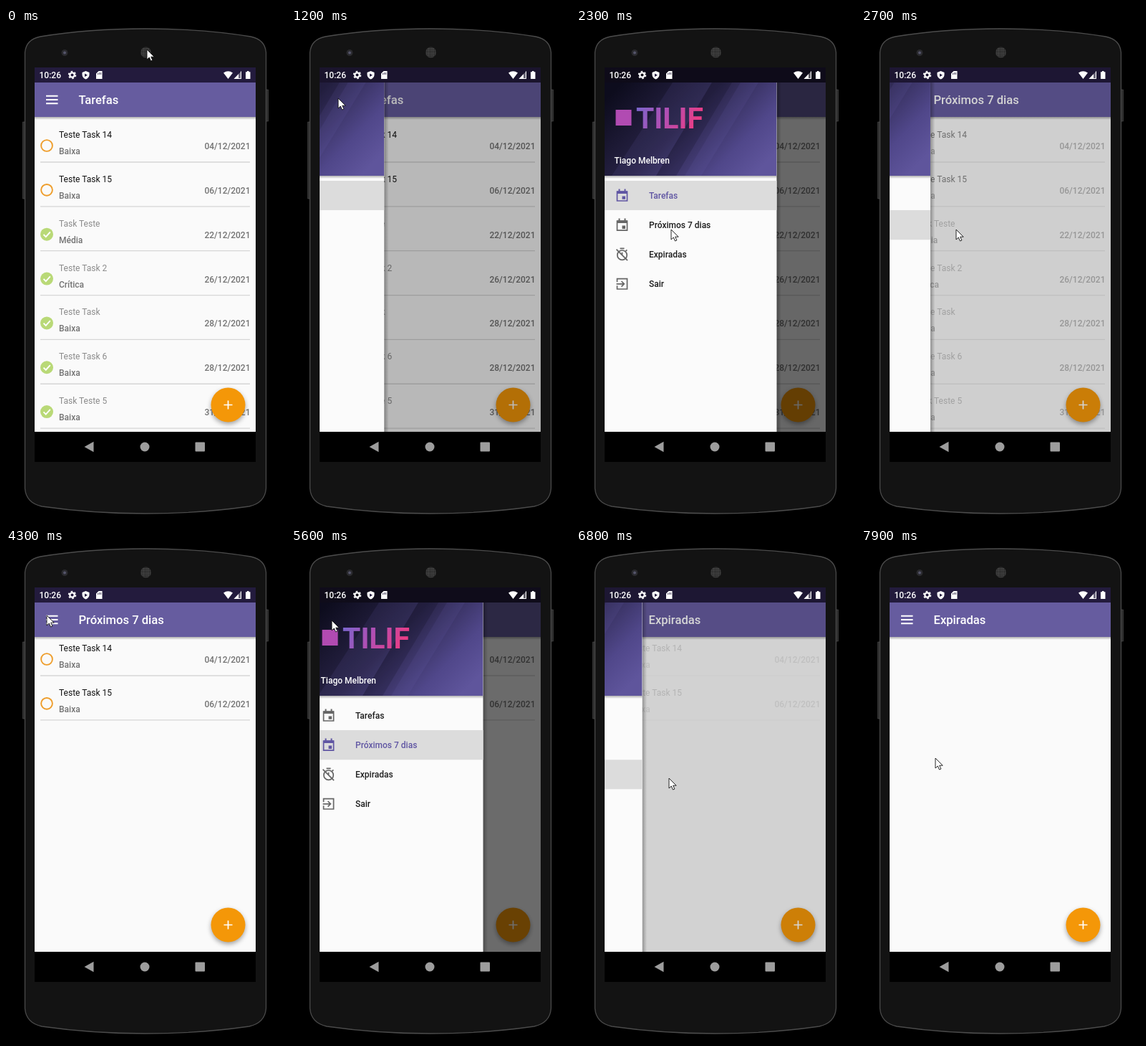
Animation of 390 by 686 pixels, one loop 8 s. Source, as an HTML page:

```html
<!DOCTYPE html>
<html lang="pt">
<head>
<meta charset="utf-8">
<title>Tarefas</title>
<style>
  html, body { margin: 0; width: 100%; height: 100%; overflow: hidden; background: #000; }
  svg { display: block; width: 390px; height: 686px; }
  text { font: 400 12px Roboto, "Noto Sans", sans-serif; }
  .med { font-weight: 500; }
  .sub { font-weight: 500; fill: #737373; }
  .end { text-anchor: end; }
  .title { font-size: 16.6px; font-weight: 500; fill: #fff; }
  .brand { font-size: 41px; font-weight: 700; }
  .fab { filter: drop-shadow(0 3px 3px rgba(0, 0, 0, .35)); }
  .item { color: #666; fill: #1d1d1d; }
  .item.on { color: #6056a3; fill: #6056a3; }
  .item .bg { fill: none; }
  .item.on .bg { fill: #dcdcdc; }
  .line { fill: none; stroke: currentColor; stroke-width: 1.7; }
</style>
</head>
<body>
<svg viewBox="0 0 390 686">
  <defs>
    <clipPath id="screen"><path d="M40 76H349V563H40Z"/></clipPath>
    <clipPath id="headClip"><path d="M0 76H240.5V206H0Z"/></clipPath>
    <linearGradient id="head" gradientUnits="userSpaceOnUse" x1="30" y1="70" x2="190" y2="225">
      <stop offset="0" stop-color="#0d0c1d"/>
      <stop offset=".45" stop-color="#292448"/>
      <stop offset=".8" stop-color="#50478a"/>
      <stop offset="1" stop-color="#5f559c"/>
    </linearGradient>
    <linearGradient id="brand" x2="1" y2=".25">
      <stop offset="0" stop-color="#7468cf"/>
      <stop offset=".5" stop-color="#b04fb4"/>
      <stop offset="1" stop-color="#e93d86"/>
    </linearGradient>
    <linearGradient id="edge">
      <stop offset="0" stop-opacity=".3"/>
      <stop offset="1" stop-opacity="0"/>
    </linearGradient>
    <linearGradient id="drop" x2="0" y2="1">
      <stop offset="0" stop-opacity=".3"/>
      <stop offset="1" stop-opacity="0"/>
    </linearGradient>
    <pattern id="mesh" width="2.4" height="2.4" patternUnits="userSpaceOnUse">
      <path d="M0 0H2.4V2.4H0Z" fill="#4a4a4a"/><circle cx="1.2" cy="1.2" r=".85" fill="#111"/>
    </pattern>
  </defs>

  <!-- phone -->
  <path d="M23.5 131H27V238H23.5ZM363 86H366.5V130H363Z" fill="#2b2b2b" stroke="#4c4c4c" stroke-width=".7"/>
  <path d="M26.5 34Q28 16 48 12Q115 1 195 1Q275 1 342 12Q362 16 363.5 34V642Q362 662 340 667Q270 677 195 677Q120 677 50 667Q28 662 26.5 642Z" fill="#131313" stroke="#4b4b4b" stroke-width="1.3"/>
  <circle cx="82" cy="34.5" r="4.5" fill="#2a2a2e"/>
  <circle cx="82" cy="34.5" r="2" fill="#55556a"/>
  <circle cx="195.5" cy="34" r="7.5" fill="url(#mesh)"/>
  <path d="M40 55H349V605H40Z"/>
  <path d="M40 55H349V76H40Z" fill="#231b3d"/>

  <g clip-path="url(#screen)">
    <path d="M40 124H349V563H40Z" fill="#fafafa"/>
    <g id="list"></g>
    <path d="M40 124H349V128H40Z" fill="url(#drop)"/>
    <path d="M40 76H349V124H40Z" fill="#665c9f"/>
    <path d="M56 94.8H72.5M56 100H72.5M56 105.2H72.5" stroke="#fff" stroke-width="1.9"/>
    <text class="title" id="title" x="101.5" y="106"></text>
    <g class="fab"><circle cx="310.5" cy="525.5" r="24" fill="#f49708"/></g>
    <path d="M304.5 525.5H316.5M310.5 519.5V531.5" stroke="#fff" stroke-width="1.7"/>
  </g>

  <path id="dim" d="M40 55H349V563H40Z"/>

  <g clip-path="url(#screen)">
    <g id="drawer">
      <path d="M240.5 76H247V563H240.5Z" fill="url(#edge)"/>
      <path d="M0 76H240.5V563H0Z" fill="#fbfbfb"/>
      <path d="M0 206H240.5V210H0Z" fill="url(#drop)"/>
      <g clip-path="url(#headClip)">
        <path d="M0 76H240.5V206H0Z" fill="url(#head)"/>
        <path d="M95 76H150L72 206H10ZM190 76H215L135 206H112Z" fill="#7a6fc0" opacity=".1"/>
        <path d="M150 76H178L100 206H72Z" fill="#05040f" opacity=".16"/>
      </g>
      <path d="M15.5 114H37.5V136H15.5Z" fill="#b14bb2"/>
      <text class="brand" x="44" y="140" fill="url(#brand)">TILIF</text>
      <text class="med" x="13.5" y="189" fill="#fff">Tiago Melbren</text>
      <g id="menu"></g>
    </g>
  </g>

  <!-- status bar -->
  <text class="med" x="46.5" y="70" fill="#fff">10:26</text>
  <g fill="none" stroke="#fff">
    <circle cx="92.5" cy="65.5" r="3.2" stroke-width="2.3"/>
    <circle cx="92.5" cy="65.5" r="4.9" stroke-width="1.7" stroke-dasharray="2.57"/>
  </g>
  <g fill="#fff">
    <path d="M111.5 60L116.5 62V65.5Q116 69.7 111.5 71.5Q107 69.7 106.5 65.5V62Z"/>
    <path d="M129.5 60H134.5V71H126V63.5Z"/>
    <path d="M304 62.5Q310.5 57.8 317 62.5L310.5 71Z"/>
    <path d="M318.5 71L329 60V71Z" fill-opacity=".35"/>
    <path d="M318.5 71L325 64.2V71ZM328 60.5H329V71H318.5L319.5 70H328Z"/>
    <path d="M335 61.3H337V60H339.5V61.3H341.5V71H335Z"/>
  </g>
  <path d="M110 63.5L114 65.7L110 68Z" fill="#231b3d"/>
  <path d="M128.5 63V65M130.5 62V65M132.5 62V65" stroke="#231b3d" stroke-width=".8"/>

  <!-- navigation bar -->
  <g fill="#9d9d9d">
    <path d="M109.5 584L122.5 576.8V591.2Z"/>
    <circle cx="194" cy="584" r="6.5"/>
    <rect x="264.5" y="577.5" width="13.5" height="13" rx="1"/>
  </g>

  <path id="cursor" d="M0 0V14L3.3 11L5.5 16L7.9 15L5.7 10.2H10.2Z" fill="#fff" stroke="#111" stroke-width=".9"/>
</svg>

<script>
const LOOP = 8000, STEP = 100, TAU = 100, WIDTH = 240.5, ROW = 61.85;
const $ = id => document.getElementById(id);

const todo = [
  ['Teste Task 14', 'Baixa', '04/12/2021'],
  ['Teste Task 15', 'Baixa', '06/12/2021'],
  ['Task Teste', 'Média', '22/12/2021', true],
  ['Teste Task 2', 'Crítica', '26/12/2021', true],
  ['Teste Task', 'Baixa', '28/12/2021', true],
  ['Teste Task 6', 'Baixa', '28/12/2021', true],
  ['Task Teste 5', 'Baixa', '31/12/2021', true]
];

const calendar = `<path class="line" d="M-7 -5.5H7V7.5H-7Z"/>
  <path d="M-7 -6H7V-2.5H-7ZM-5 -9H-3V-5H-5ZM3 -9H5V-5H3ZM0 1H4.5V5.3H0Z" fill="currentColor"/>`;
const timerOff = `<circle class="line" cy="1" r="6.7"/>
  <path class="line" d="M-3 -8.3H3M0 -3V1.5M5 -4.5L6.8 -6.3M-8 -7L7.5 8.5"/>`;
const exit = `<path class="line" d="M-7 -2.5V-7.2H7V7.2H-7V2.5M-8 0H2.5M-1 -3.8L2.8 0L-1 3.8"/>`;
const items = [['Tarefas', calendar], ['Próximos 7 dias', calendar], ['Expiradas', timerOff], ['Sair', exit]];

// Drawer toggles: time, open
const toggles = [[1153, 1], [2556, 0], [5300, 1], [6648, 0]];
const pages = [[0, 0], [2556, 1], [6648, 2]];
// Lists: appear, start of fade, end of fade, vertical shift, rows
const lists = [[0, 2556, 2846, 0, 7], [3500, 6648, 6828, -9, 2]];
// Pointer: time, x, y
const path = [
  [0, 197, 30], [100, 195, 32], [800, 68, 97], [900, 66, 98], [1600, 66, 98],
  [2000, 107, 205], [2300, 133, 281], [3400, 133, 281], [4000, 62, 105],
  [4300, 57, 94], [5400, 57, 94], [5500, 57, 101], [5700, 57, 101],
  [6200, 121, 305], [6400, 130, 321], [7100, 130, 321], [7500, 107, 295],
  [7700, 106, 295], [7900, 104, 293], [8000, 104, 293]
];

const mark = done => done
  ? `<circle cx="57" cy="164" r="9" fill="#b9d977"/>
     <path d="M52.5 164.3L55.7 167.5L61.8 160.8" fill="none" stroke="#fff" stroke-width="1.9"/>`
  : `<circle cx="57" cy="164" r="7.9" fill="none" stroke="#ee9d2b" stroke-width="1.9"/>`;

const rowMarkup = ([name, level, date, done], i) => `<g transform="translate(0 ${i * ROW})">
  ${mark(done)}
  <text x="74" y="153" fill="${done ? '#8b8b8b' : '#111'}">${name}</text>
  <text class="sub" x="74" y="176">${level}</text>
  <text class="sub end" x="341.5" y="169">${date}</text>
  <path d="M48 187H341" stroke="#d6d6d6" stroke-width="1.3"/></g>`;

const itemMarkup = ([label, icon], i) => `<g class="item" transform="translate(0 ${213 + i * 41.1})">
  <path class="bg" d="M0 0H240.5V41.1H0Z"/>
  <g transform="translate(24.5 20.5)">${icon}</g>
  <text class="med" x="62" y="25">${label}</text></g>`;

$('list').innerHTML = todo.map(rowMarkup).join('');
$('menu').innerHTML = items.map(itemMarkup).join('');
const rows = [...$('list').children], entries = [...$('menu').children];

const last = (table, t) => table.filter(e => e[0] <= t).pop();

function drawerAt(t) {
  const e = last(toggles, t);
  if (!e) return 0;
  const rest = Math.exp((e[0] - t) / TAU);
  return e[1] ? 1 - rest : rest;
}

function pointerAt(t) {
  const i = path.findIndex(k => k[0] > t);
  const [t0, x0, y0] = path[i - 1], [t1, x1, y1] = path[i];
  const k = (t - t0) / (t1 - t0);
  return [x0 + (x1 - x0) * k, y0 + (y1 - y0) * k];
}

function draw(t) {
  const p = drawerAt(t), page = last(pages, t)[1];
  $('drawer').setAttribute('transform', `translate(${40 - WIDTH * (1 - p)} 0)`);
  $('drawer').style.display = p < .003 ? 'none' : '';
  $('dim').setAttribute('opacity', .78 * p - .19 * p * p);
  $('title').textContent = items[page][0];
  entries.forEach((el, i) => el.classList.toggle('on', i === page));

  const [, from, to, shift, count] = last(lists, t);
  $('list').setAttribute('transform', `translate(0 ${shift})`);
  $('list').setAttribute('opacity', Math.min(1, Math.max(0, (to - t) / (to - from))));
  rows.forEach((el, i) => { el.style.display = i < count ? '' : 'none'; });

  $('cursor').setAttribute('transform', `translate(${pointerAt(t)})`);
}

const start = performance.now();
function tick() {
  const t = Math.max(0, performance.now() - start) % LOOP;
  draw(Math.floor(t / STEP) * STEP);
  requestAnimationFrame(tick);
}
tick();
</script>
</body>
</html>
```
